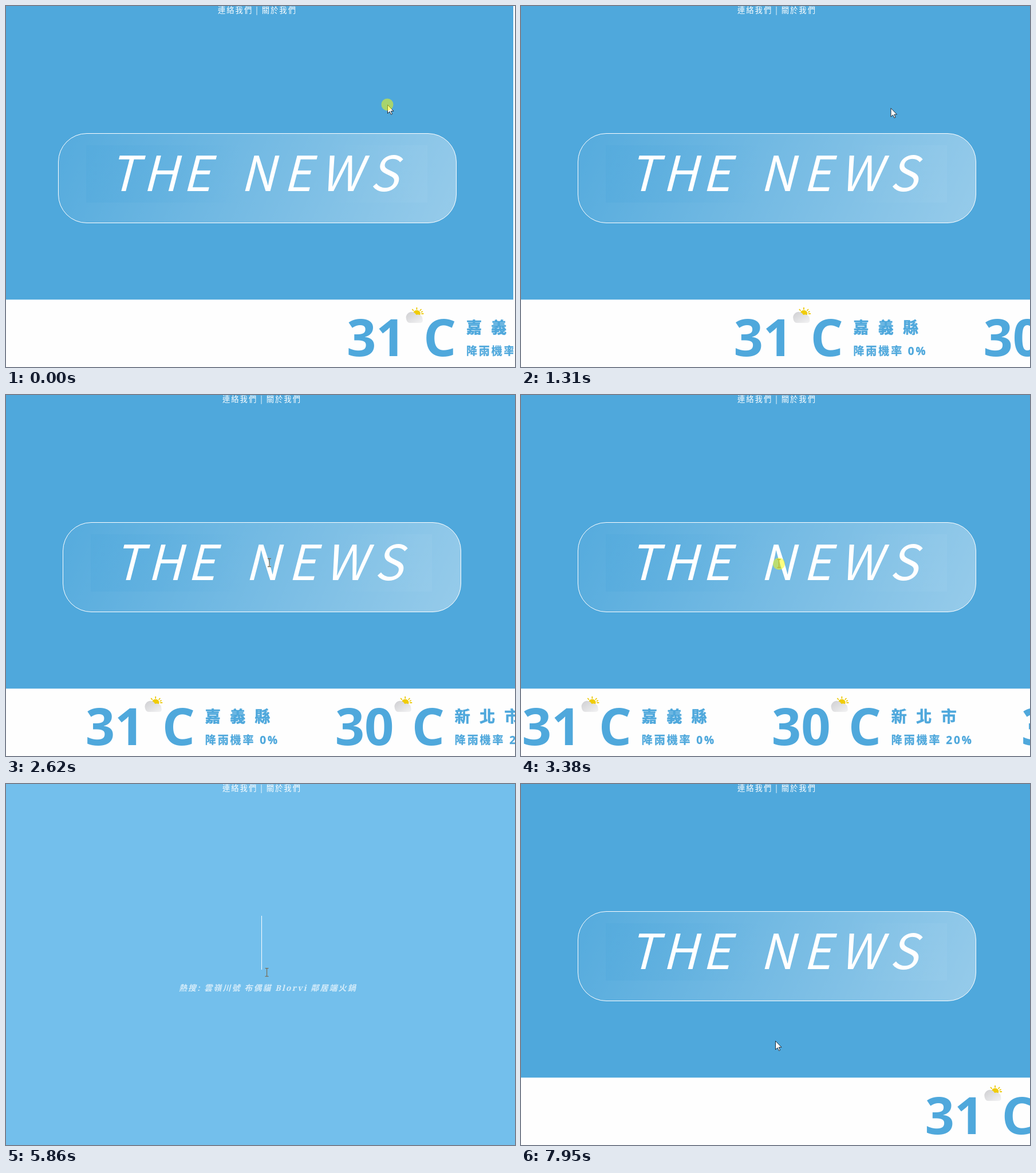
An HTML page that plays this animation: 889 px wide and 630 px high, repeating every 8 s.

```html
<!DOCTYPE html>
<html lang="zh-Hant">
<head>
<meta charset="utf-8">
<title>The News</title>
<style>
  html, body { margin: 0; width: 100%; height: 100%; overflow: hidden; background: #fefefe; }
  svg { display: block; width: 889px; height: 630px; }
  text { white-space: pre; font-family: "Noto Sans CJK TC", "Noto Sans CJK JP", "Noto Sans", sans-serif; }
  .header { font-size: 13.3px; letter-spacing: 2px; fill: #fff; }
  .title { font-size: 84.5px; font-weight: 350; fill: #fff; }
  .hot { font: 700 14px "Noto Serif", "Noto Sans CJK TC", "Noto Sans CJK JP", serif; letter-spacing: 2.1px; fill: #fff; }
  #ticker text { font-family: "Open Sans", "Noto Sans CJK TC", "Noto Sans CJK JP", sans-serif; font-weight: 700; fill: #4fa8dc; }
  #ticker .degree { font-size: 90px; }
  #ticker .city { font-size: 27px; letter-spacing: 16.4px; stroke: #4fa8dc; stroke-width: .7px; }
  #ticker .rain { font-size: 19px; letter-spacing: 2.9px; stroke: #4fa8dc; stroke-width: .3px; }
</style>
</head>
<body>
<svg viewBox="0 0 889 630">
  <defs>
    <linearGradient id="glass" x1="0" y1=".45" x2="1" y2=".55">
      <stop stop-color="#fff" stop-opacity=".05"/>
      <stop offset="1" stop-color="#fff" stop-opacity=".39"/>
    </linearGradient>
    <linearGradient id="field">
      <stop stop-color="#4fa8dc" stop-opacity=".35"/>
      <stop offset=".45" stop-color="#4fa8dc" stop-opacity="0"/>
      <stop offset=".7" stop-color="#fff" stop-opacity="0"/>
      <stop offset="1" stop-color="#fff" stop-opacity=".04"/>
    </linearGradient>
    <linearGradient id="cloudShade" x1="0" y1="0" x2="1" y2="1">
      <stop stop-color="#cfcfd2"/>
      <stop offset="1" stop-color="#f3f3f4"/>
    </linearGradient>
    <g id="weather">
      <path d="M18 0V4M10 3L12.5 6M26 3L23.5 6M30 11H26M7.5 10H10M28.5 7L25.5 8.5" stroke="#ecca0c" stroke-width="1.8"/>
      <circle cx="18" cy="11" r="6.3" fill="#f0cc08"/>
      <path d="M7 27A7 9 0 0 1 2 11 9 9 0 0 1 17 13 8 7 0 0 1 28 20Q30 27 24 27Z" fill="url(#cloudShade)"/>
    </g>
  </defs>

  <rect id="sky" width="889"/>
  <g id="page">
    <text class="header" x="378" y="12">連絡我們 | 關於我們</text>
    <g id="news">
      <rect x="99.5" y="222.5" width="695" height="156" rx="49.5" fill="url(#glass)" stroke="#fff"/>
      <rect x="148" y="243" width="596" height="100" fill="url(#field)"/>
      <g class="title" transform="translate(0 322.5) skewX(-14.5)">
        <text x="188" letter-spacing="8">THE</text>
        <text x="417" letter-spacing="13.8">NEWS</text>
      </g>
      <g id="ticker"></g>
    </g>
  </g>
  <g id="search">
    <text id="hot" class="hot">熱搜: 雲嶺川號 布偶貓 Blorvi 鄰居端火鍋</text>
    <rect id="caret" x="446" y="230" width="1" height="94" fill="#fff"/>
  </g>
  <rect id="scrollbar" x="886" width="3" height="630" fill="#fdfdfd"/>

  <g id="pointer">
    <path id="arrow" d="M.5 .5V15.5L4 12.3 6.4 17.5 8.6 16.5 6.3 11.4H11Z" fill="#fff" stroke="#1b2a38"/>
    <path id="beam" d="M-3 -7.5H3M0 -7V7M-3 6.5H3" fill="none" stroke="#78705c" stroke-width="1.3"/>
    <circle id="press" r="10.5" fill="#ff0" fill-opacity=".5"/>
  </g>
</svg>

<script>
const LOOP = 8000, SPEED = 0.178, ITEM_GAP = 436;
const SEARCH = [[3460, 6710]];
const PRESSES = [[0, 70], [3380, 3540], [6710, 6880]];
const CARET = [[3460, 4000], [4460, 5000], [5550, 6080], [6560, 6710]];
// time, x, y
const POINTER = [
  [0, 666, 172], [930, 666, 171], [1310, 645, 178], [1690, 614, 183], [2540, 460, 293],
  [2640, 460, 293], [3200, 450, 294], [3540, 451, 295], [5710, 451, 295], [5990, 461, 370],
  [6250, 432, 456], [7000, 432, 456], [7500, 444, 448], [8000, 444, 448]
];
const FORECAST = [['31', '嘉義縣', '0%'], ['30', '新北市', '20%'], ['31', '臺南市', '10%']];

const el = id => document.getElementById(id);
const show = (id, on) => el(id).setAttribute('visibility', on ? 'inherit' : 'hidden');
const move = (id, x, y, extra = '') => el(id).setAttribute('transform', `translate(${x} ${y})${extra}`);
const within = (spans, t) => spans.some(([from, to]) => t >= from && t < to);

el('ticker').innerHTML = FORECAST.map(([degree, city, rain], i) => `
  <g transform="translate(${i * ITEM_GAP} 0)">
    <text class="degree" x="-2.5" y="611">${degree}</text>
    <use href="#weather" x="102" y="526"/>
    <text class="degree" x="131.5" y="611">C</text>
    <text class="city" x="206.5" y="571">${city}</text>
    <text class="rain" x="206.5" y="608.5">降雨機率 ${rain}</text>
  </g>`).join('');

// Motion advances in steps like the recorded screen.
function stepped(t) {
  if (t < 70) return 0;
  const start = t < 7025 ? 70 : 7025;
  return start + Math.floor((t - start) / 76.9) * 76.9;
}

function pointerAt(t) {
  const i = POINTER.findIndex(key => key[0] > t);
  const [t0, x0, y0] = POINTER[i - 1], [t1, x1, y1] = POINTER[i];
  const p = (t - t0) / (t1 - t0);
  return [x0 + (x1 - x0) * p, y0 + (y1 - y0) * p];
}

function draw(t) {
  const tick = stepped(t), searching = within(SEARCH, t), scrolled = t < 70;

  el('sky').setAttribute('height', searching ? 630 : 512.4);
  el('sky').setAttribute('fill', searching ? '#73bfec' : '#4fa8dc');
  move('page', scrolled ? -8 : 0, 0);
  show('scrollbar', scrolled);
  show('news', !searching);
  show('search', searching);

  show('ticker', t < 3460 || t >= 7025);
  move('ticker', t < 3460 ? 374 - (tick - 1300) * SPEED : 708 - (tick - 7948) * SPEED, 0);

  const rise = Math.min(1, Math.max(0, (tick - 3960) / 500));
  const eased = 1 - (1 - rise) ** 2;
  el('hot').setAttribute('opacity', 0.7 * eased);
  move('hot', 302, 385.5 - 25 * eased, ' skewX(-14)');
  show('caret', within(CARET, t));

  const [x, y] = pointerAt(tick);
  const overField = x > 148 && x < 744 && y > 243 && y < 343;
  move('pointer', x, y);
  show('arrow', !overField);
  show('beam', overField);
  show('press', within(PRESSES, t));
}

function frame() {
  draw(performance.now() % LOOP);
  requestAnimationFrame(frame);
}
frame();
</script>
</body>
</html>
```
